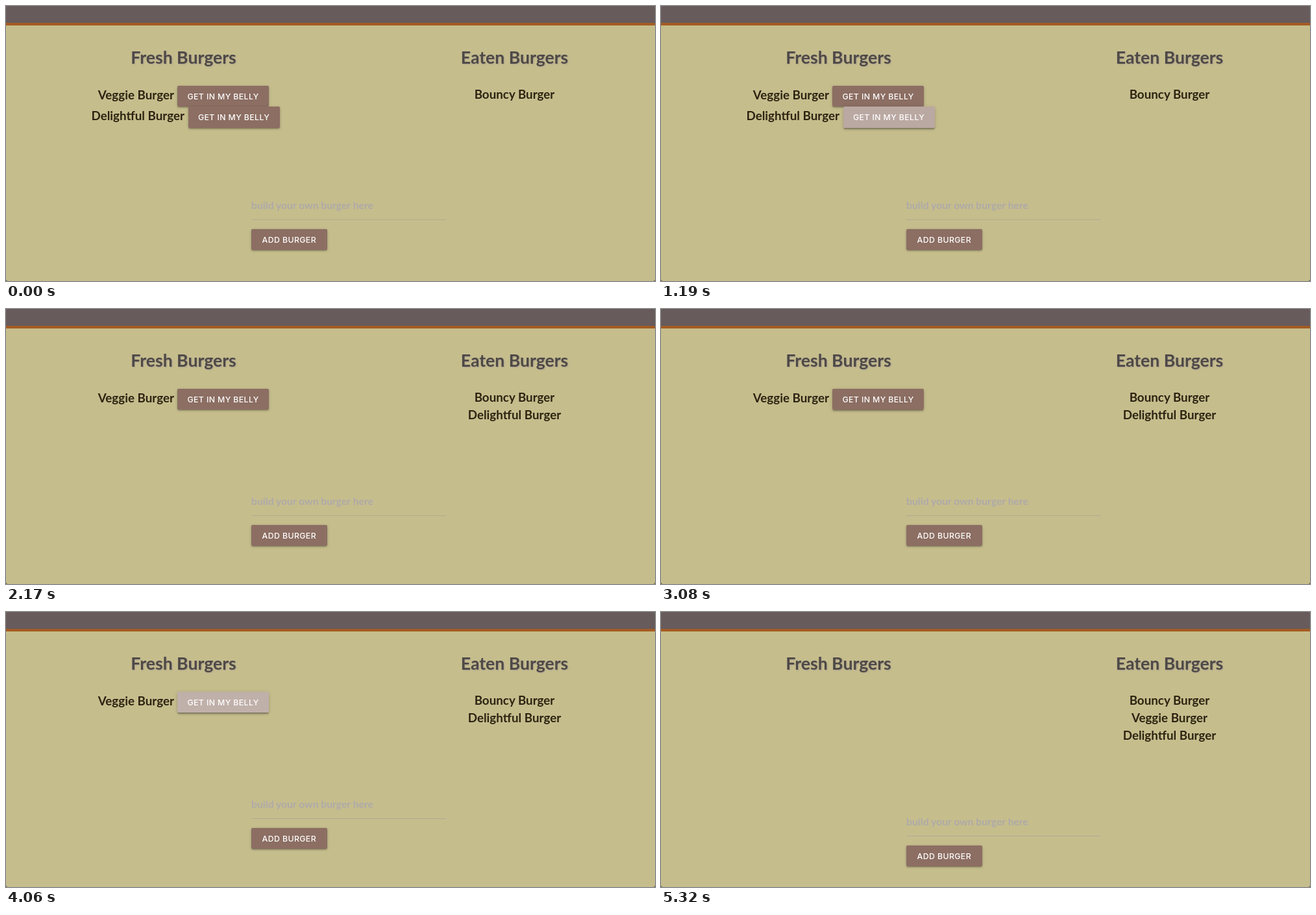
These frames come from a looping animation (1000 by 424 pixels, 5880 ms). An HTML page:

```html
<!DOCTYPE html>
<html lang="en">
<head>
<meta charset="utf-8">
<title>Burgers</title>
<style>
  html, body { margin: 0; width: 100%; height: 100%; overflow: hidden; background: #4a4540; }
  #stage {
    position: relative; width: 1000px; height: 424px; overflow: hidden;
    border-radius: 3px; background: #c6bd8d;
    font: 700 18.8px Lato, sans-serif; color: #2c2411;
  }
  #stage div { position: absolute; }
  #bar { width: 100%; height: 26px; background: #675b5c; border-bottom: 4px solid #a55c22; }

  /* zero line height: top is the middle of the line */
  .text { line-height: 0; white-space: nowrap; }
  .mid { transform: translateX(-50%); }
  .title { top: 79.2px; font-size: 26.6px; color: #4e4947; text-shadow: 1px 1px 2px #a99f8e; }
  .fresh { left: 273.5px; }
  .eaten { left: 783.5px; }

  .button {
    --h: 0;
    display: flex; align-items: center; justify-content: center;
    height: 32.4px; border-radius: 2px; overflow: hidden;
    background: #8c6e63; color: #fff;
    font: 500 12.3px Inter, sans-serif; letter-spacing: .4px; white-space: nowrap;
    box-shadow:
      0 calc(1.8px + .9px * var(--h)) calc(1.8px + .9px * var(--h)) rgba(0, 0, 0, .14),
      0 2.7px .9px calc(-1.8px + .9px * var(--h)) rgba(0, 0, 0, calc(.12 + .08 * var(--h))),
      0 .9px calc(4.5px + 1.8px * var(--h)) rgba(0, 0, 0, calc(.2 - .08 * var(--h)));
  }
  .button i {
    position: absolute; border-radius: 50%; background: rgba(255, 255, 255, .45);
    left: 46%; top: 50%; width: 290px; height: 290px; margin: -145px;
  }
  .button span { position: relative; }
  .belly { width: 141px; }

  #form { left: 378px; top: 0; }
  #hint { top: 306.8px; font-size: 15.7px; color: #aeaaa8; }
  #line { top: 329px; width: 300px; height: 1px; background: #b1ab91; }
  #add { top: 344px; width: 116.6px; }
</style>
</head>
<body>
<div id="stage">
  <div id="bar"></div>
  <div class="text mid title fresh">Fresh Burgers</div>
  <div class="text mid title eaten">Eaten Burgers</div>

  <div id="veggieRow">
    <div class="text" style="right:-259px; top:136.7px">Veggie Burger</div>
    <div class="button belly" id="veggie" style="left:264px; top:123px"><i></i><span>GET IN MY BELLY</span></div>
  </div>
  <div id="delightRow">
    <div class="text" style="right:-275px; top:168.7px">Delightful Burger</div>
    <div class="button belly" id="delight" style="left:280.5px; top:155.4px"><i></i><span>GET IN MY BELLY</span></div>
  </div>

  <div class="text mid eaten" style="top:135.7px">Bouncy Burger</div>
  <div class="text mid eaten" id="veggieEaten" style="top:162.7px">Veggie Burger</div>
  <div class="text mid eaten" id="delightEaten">Delightful Burger</div>

  <div id="form">
    <div class="text" id="hint">build your own burger here</div>
    <div id="line"></div>
    <div class="button" id="add"><span>ADD BURGER</span></div>
  </div>
</div>
<script>
const LOOP = 5880, FIRST_EATEN = 1330, SECOND_EATEN = 4130;
const $ = id => document.getElementById(id);
const clamp = x => Math.min(1, Math.max(0, x));
const show = (id, on) => $(id).style.visibility = on ? 'visible' : 'hidden';

// CSS "ease-out", cubic-bezier(0, 0, .58, 1), solved by bisection
function easeOut(x) {
  let lo = 0, hi = 1;
  for (let i = 0; i < 20; i++) {
    const s = (lo + hi) / 2;
    if (1.74 * s * s * (1 - s) + s ** 3 < x) lo = s; else hi = s;
  }
  return lo * lo * (3 - 2 * lo);
}

function press(id, t, hoverAt, clickAt) {
  const button = $(id), ripple = button.querySelector('i');
  const grow = easeOut(clamp((t - clickAt) / 700));
  button.style.setProperty('--h', easeOut(clamp((t - hoverAt) / 280)));
  ripple.style.transform = `scale(${grow})`;
  ripple.style.opacity = grow;
}

function draw() {
  const t = performance.now() % LOOP;
  const eaten = (t >= FIRST_EATEN) + (t >= SECOND_EATEN);
  show('delightRow', eaten < 1);
  show('veggieRow', eaten < 2);
  show('delightEaten', eaten > 0);
  show('veggieEaten', eaten > 1);
  $('delightEaten').style.top = (eaten > 1 ? 189.7 : 162.7) + 'px';
  $('form').style.top = [0, -11, 16][eaten] + 'px';
  press('delight', t, 320, 685);
  press('veggie', t, 2660, 3340);
  requestAnimationFrame(draw);
}
draw();
</script>
</body>
</html>
```
